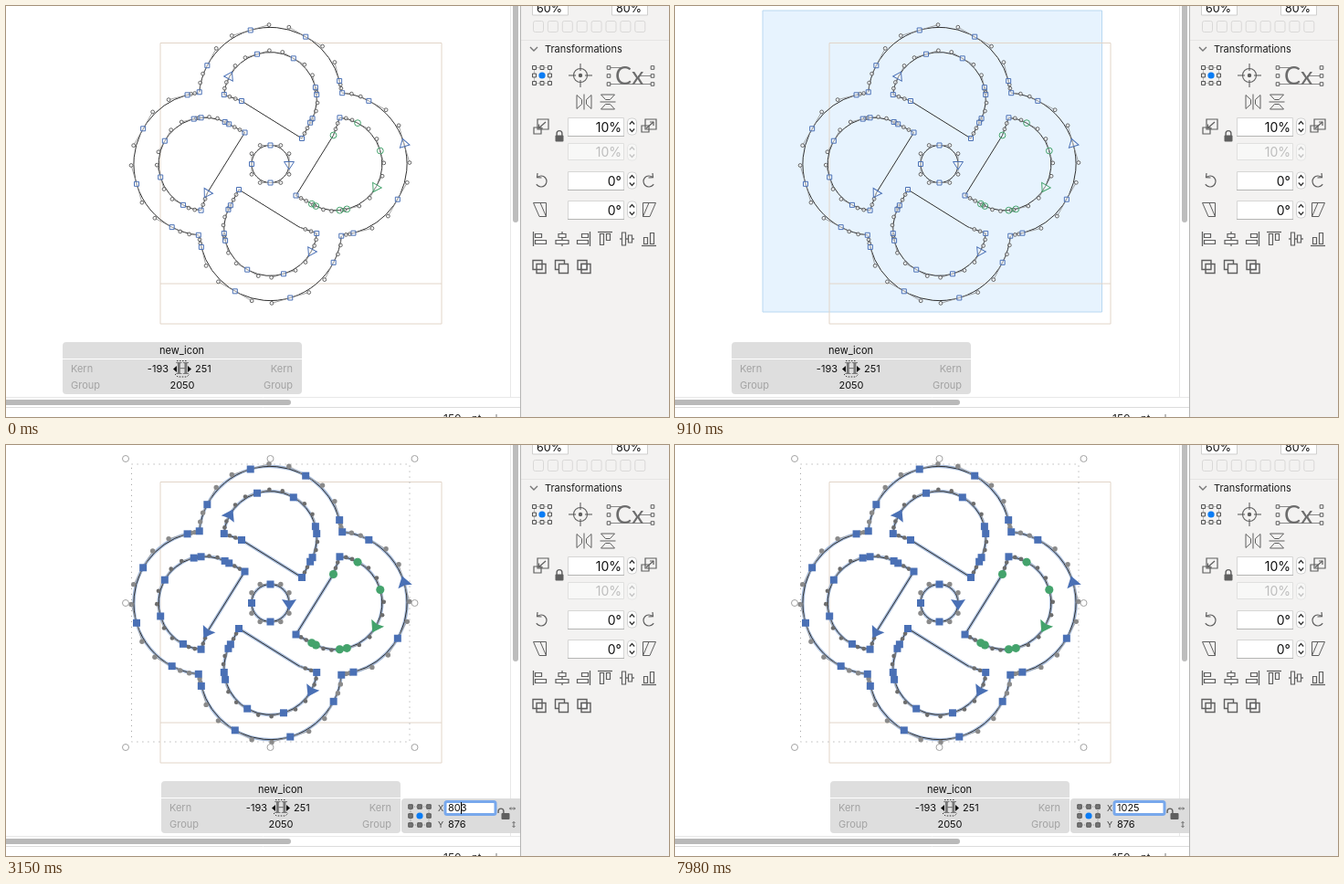
Animation, 726 px wide and 450 px high, one loop 8000 ms. Source, as an HTML page with a canvas:

```html
<!DOCTYPE html>
<html lang="en">
<head>
<meta charset="utf-8">
<title>Glyph editor</title>
<style>
html, body { margin: 0; width: 726px; height: 450px; overflow: hidden; background: #fff; }
canvas { display: block; width: 726px; height: 450px; }
</style>
</head>
<body>
<canvas id="stage"></canvas>
<script>
const W = 726, H = 450, LOOP = 8000;
const canvas = document.getElementById('stage');
const g = canvas.getContext('2d');
const dpr = window.devicePixelRatio || 1;
canvas.width = W * dpr;
canvas.height = H * dpr;

const BLUE = '#4a70b5', GREEN = '#44a36c', ACCENT = '#0a7cf5', INK = '#5f5f5f', PANEL = '#f3f2f1';
const CX = 289.5, CY = 173, LOBE = -71.5, R_OUT = 78.1, R_IN = 50.9;
const OUTER = [185.3, 207.7, 253.8, 299.7, 345.6, 354.7];
const INNER = [185, 208.2, 253.5, 299.8, 346, 355, 385.2, 391];
const TIP = [34.5, -28], HIP = [-31.5, -69];
const rad = d => d * Math.PI / 180;

// ---------- drawing helpers ----------
function line(color, width, ...pts) {
  g.beginPath();
  for (let i = 0; i < pts.length; i += 2) g.lineTo(pts[i], pts[i + 1]);
  g.strokeStyle = color;
  g.lineWidth = width;
  g.stroke();
}
function box(x, y, w, h, fill, stroke, r = 0, lw = 1) {
  g.beginPath();
  g.roundRect(x, y, w, h, r);
  if (fill) { g.fillStyle = fill; g.fill(); }
  if (stroke) { g.strokeStyle = stroke; g.lineWidth = lw; g.stroke(); }
}
function disc(x, y, r, fill, stroke, lw = 1) {
  g.beginPath();
  g.arc(x, y, r, 0, 7);
  if (fill) { g.fillStyle = fill; g.fill(); }
  if (stroke) { g.strokeStyle = stroke; g.lineWidth = lw; g.stroke(); }
}
function poly(fill, stroke, ...pts) {
  g.beginPath();
  for (let i = 0; i < pts.length; i += 2) g.lineTo(pts[i], pts[i + 1]);
  g.closePath();
  if (fill) { g.fillStyle = fill; g.fill(); }
  if (stroke) { g.strokeStyle = stroke; g.lineWidth = 1; g.stroke(); }
}
function text(s, x, y, size = 11, color = '#111', align = 'left', family = 'Inter, sans-serif', weight = 400) {
  g.font = `${weight} ${size}px ${family}`;
  g.textAlign = align;
  g.fillStyle = color;
  g.fillText(s, x, y);
}
function at(x, y, draw, angle = 0, flip = 1) {
  g.save();
  g.translate(x, y);
  g.rotate(angle);
  g.scale(flip, 1);
  draw();
  g.restore();
}

// ---------- glyph ----------
const polar = (r, d, cy = LOBE) => [r * Math.cos(rad(d)), cy + r * Math.sin(rad(d))];
const turn = (k, draw) => at(CX, CY, draw, k * Math.PI / 2);

function tracePath() {
  g.beginPath();
  for (let k = 0; k < 4; k++) turn(k, () => {
    g.moveTo(...polar(R_OUT, OUTER[0]));
    g.arc(0, LOBE, R_OUT, rad(OUTER[0]), rad(OUTER[5]));
    g.moveTo(...polar(R_IN, INNER[0]));
    g.arc(0, LOBE, R_IN, rad(INNER[0]), rad(INNER[7]));
    g.lineTo(...TIP);
    g.lineTo(...HIP);
    g.closePath();
  });
  g.moveTo(CX + 20.5, CY);
  g.arc(CX, CY, 20.5, 0, 7);
}
function handle(p, q, sel, small) {
  line(sel ? '#999' : '#8d8d8d', 0.8, ...p, ...q);
  if (sel) disc(...q, small ? 2.3 : 2.7, small ? '#6d6d6d' : '#8a8a8a');
  else disc(...q, 1.9, 'rgba(255,255,255,.6)', '#555', 0.9);
}
function arcHandles(r, degs, sel, small, cy) {
  for (let i = 1; i < degs.length; i++) {
    const a = rad(degs[i - 1]), b = rad(degs[i]);
    const len = 4 / 3 * Math.tan((b - a) / 4) * r;
    const p = polar(r, degs[i - 1], cy), q = polar(r, degs[i], cy);
    handle(p, [p[0] - len * Math.sin(a), p[1] + len * Math.cos(a)], sel, small);
    handle(q, [q[0] + len * Math.sin(b), q[1] - len * Math.cos(b)], sel, small);
  }
}
function lineHandles(p, q, sel) {
  const mix = f => [p[0] + (q[0] - p[0]) * f, p[1] + (q[1] - p[1]) * f];
  handle(p, mix(0.35), sel, true);
  handle(q, mix(0.68), sel, true);
}
function node(p, sel, color = BLUE) {
  const [x, y] = p;
  if (color === GREEN) disc(x, y, sel ? 4.5 : 3.4, sel ? GREEN : null, GREEN, sel ? 0.1 : 1);
  else if (sel) box(x - 4, y - 4, 8, 8, BLUE);
  else box(x - 2.5, y - 2.5, 5, 5, 'rgba(255,255,255,.4)', BLUE);
}
// flat triangle pointing along the path
function arrow(p, angle, sel, color = BLUE) {
  at(...p, () => sel
    ? poly(color, null, 8, 0, -4, -8, -2.5, 0, -4, 8)
    : poly('rgba(255,255,255,.3)', color, 6, 0, -2.5, -5.5, -2.5, 5.5), angle);
}
function drawGlyph(sel) {
  tracePath();
  if (sel) { g.strokeStyle = '#a5bad9'; g.lineWidth = 3.4; g.stroke(); }
  g.strokeStyle = '#2f2f2f';
  g.lineWidth = 1;
  g.stroke();

  for (let k = 0; k < 4; k++) turn(k, () => {
    arcHandles(R_OUT, OUTER, sel);
    arcHandles(R_IN, INNER, sel, true);
    lineHandles(polar(R_IN, INNER[7]), TIP, sel);
    lineHandles(HIP, polar(R_IN, INNER[0]), sel);
  });
  at(CX, CY, () => arcHandles(20.5, [0, 90, 180, 270, 360], sel, false, 0));

  const start = [1, 3, 1, 8];
  const slope = Math.atan2(HIP[1] - TIP[1], HIP[0] - TIP[0]);
  for (let k = 0; k < 4; k++) turn(k, () => {
    OUTER.slice(0, 5).forEach((d, i) => {
      const p = polar(R_OUT, d);
      if (k === 1 && i === 2) arrow(p, rad(d - 90), sel);
      else node(p, sel);
    });
    const soft = k === 1 ? GREEN : BLUE;
    const pts = [...INNER.map(d => polar(R_IN, d)), HIP];
    pts.forEach((p, i) => {
      if (i === start[k]) arrow(p, i < 8 ? rad(INNER[i] + 90) : slope, sel, soft);
      else if (!(k === 2 && i === 8)) node(p, sel, i ? soft : BLUE);
    });
    node(TIP, sel);
  });
  for (const d of [90, 180, 270]) at(CX, CY, () => node(polar(20.5, d, 0), sel));
  arrow([CX + 20.5, CY], Math.PI / 2, sel);
}
function drawBounds() {
  g.setLineDash([1.2, 4.8]);
  box(137.5, 21, 304.5, 304, null, '#aaa');
  g.setLineDash([]);
  for (const x of [131, 289.5, 447.5])
    for (const y of [15, 173, 331])
      if (x !== 289.5 || y !== 173) disc(x, y, 3.5, '#fff', '#a3a3a3');
}

// ---------- marquee ----------
function marquee(t) {
  const s = Math.floor(t / 70) * 70;
  const keys = [[630, 277, 199], [910, 371.5, 330], [980, 377.5, 339], [1190, 385, 340.5]];
  if (s < 630) {
    const p = Math.pow((s - 140) / 490, 1.4);
    return [277 * p, 199 * p];
  }
  for (let i = 1; i < keys.length; i++) {
    const [a, aw, ah] = keys[i - 1], [b, bw, bh] = keys[i];
    if (s <= b) {
      const f = (s - a) / (b - a);
      return [aw + (bw - aw) * f, ah + (bh - ah) * f];
    }
  }
  return [385, 340.5];
}

// ---------- info strip ----------
function padlock(x, y, open) {
  box(x - 4.5, y - 1, 9, 7, INK, null, 1);
  g.beginPath();
  g.arc(x - (open ? 5 : 0), y - 3, 2.9, Math.PI, 0);
  g.lineTo(x + (open ? -2.1 : 2.9), y);
  g.moveTo(x - (open ? 7.9 : 2.9), y - 3);
  g.lineTo(x - (open ? 7.9 : 2.9), y - (open ? 1 : 0));
  g.strokeStyle = INK;
  g.lineWidth = 1.4;
  g.stroke();
}
function refGrid(x, y, step, size, fill) {
  g.setLineDash([1, 1]);
  box(x - step, y - step, step * 2, step * 2, null, '#888');
  g.setLineDash([]);
  for (const i of [-1, 0, 1]) for (const j of [-1, 0, 1])
    if (i || j) box(x + i * step - size / 2, y + j * step - size / 2, size, size, fill, '#555');
  disc(x, y, 3.6, ACCENT);
}
function drawInfo(x) {
  const GREY = '#a3a3a3';
  box(x, 368, 262, 18, '#dedede', null, [4, 4, 0, 0]);
  box(x, 387, 262, 38, '#dedede', null, [0, 0, 4, 4]);
  text('new_icon', x + 130.5, 381, 11, '#111', 'center');
  for (const [s, y] of [['Kern', 401], ['Group', 419]]) {
    text(s, x + 9, y, 11, GREY);
    text(s, x + 252, y, 11, GREY, 'right');
  }
  text('-193', x + 116, 401, 11, '#111', 'right');
  text('251', x + 145, 401);
  text('2050', x + 131, 419, 11, '#111', 'center');
  at(x + 131, 397, () => {
    text('H', 0, 6, 18, '#777', 'center', '"Noto Serif", serif', 700);
    g.setLineDash([1.5, 1.5]);
    line('#444', 1, -6, -8.5, 6, -8.5);
    line('#333', 1, -8, 6, -5, 9, 5, 9, 8, 6);
    g.setLineDash([]);
    poly('#111', null, -10, 0.5, -6, -3, -6, 4);
    poly('#111', null, 10, 0.5, 6, -3, 6, 4);
  });
}

// [time, value, caret index, all selected]
const TYPING = [
  [3150, '803', 2], [3850, '803', 3], [3990, '803', -1, true],
  [5950, '1', 1], [6370, '10', 2], [6930, '10', -1], [7000, '102', 3],
  [7350, '1025', 4], [7980, '1025', -1]
];
function drawCoords(t) {
  box(433, 387, 130, 38, '#dcdcdc', null, [4, 0, 0, 4]);
  refGrid(453, 406, 10, 4.5, '#777');
  text('X', 473, 401, 9, '#444');
  text('Y', 473, 419, 9, '#444');
  text('876', 484, 419);
  const state = TYPING.filter(k => k[0] <= t).pop();
  if (state) {
    const [, value, caret, all] = state;
    box(481, 390.5, 55, 14, '#fff', '#78a8ec', 2, 3);
    g.font = '11px Inter, sans-serif';
    if (all) box(483.5, 391, g.measureText(value).width + 1.5, 13, '#b3d7ff');
    text(value, 484, 401);
    if (caret >= 0) {
      const cx = Math.round(484 + g.measureText(value.slice(0, caret)).width) + 0.5;
      line('#000', 1, cx, 391, cx, 404);
    }
  } else text('803', 484, 401);
  padlock(547, 404, true);
  const double = () => {
    line(INK, 0.9, -3, 0, 3, 0);
    line(INK, 0.9, -1.5, -1.5, -3, 0, -1.5, 1.5);
    line(INK, 0.9, 1.5, -1.5, 3, 0, 1.5, 1.5);
  };
  at(554.5, 398, double);
  at(556, 415.5, double, Math.PI / 2);
}

function drawPointer(t) {
  if (t >= 4130 && t < 4480) {
    line('#222', 1, 502.5, 388, 502.5, 404);
    line('#222', 1, 499, 387, 502.5, 388.5, 506, 387);
    line('#222', 1, 499, 404.5, 502.5, 403, 506, 404.5);
  }
  if (t >= 5390 && t < 5950)
    poly('#000', '#fff', 579, 369, 579, 382.5, 582.2, 379.6, 584.5, 385, 586.8, 384, 584.5, 378.8, 589, 378.6);
}

// ---------- sidebar ----------
function field(y, s, off) {
  box(615.5, y + 0.5, 61, off ? 18 : 20, off ? '#f8f8f7' : '#fff', off ? '#e0e0df' : '#d6d6d5');
  if (!off) line('#b5b5b4', 1, 615, y + 20.5, 677, y + 20.5);
  text(s, 674, y + (off ? 14.5 : 15.5), 14, off ? '#bdbdbd' : '#111', 'right');
  const m = y + 10, c = off ? '#c4c4c4' : '#333';
  box(680.5, m - 9, 10, 18, off ? '#f7f7f6' : '#fff', off ? '#e6e6e5' : '#d0d0d0', 4);
  line(c, 1.3, 682.8, m - 2.5, 685.5, m - 5.5, 688.2, m - 2.5);
  line(c, 1.3, 682.8, m + 2.5, 685.5, m + 5.5, 688.2, m + 2.5);
}
function scaleIcon(grow) {
  box(-8, grow ? -1 : 1, 8, 7, null, INK, 0, 1.2);
  box(-4, -8, 12, 11, null, INK, 0, 1.2);
  line(INK, 1.2, -3, 2, 5, -5);
  if (grow) line(INK, 1.2, 1, -5, 5, -5, 5, -1);
  else line(INK, 1.2, -2.5, -2.5, -2.5, 2, 2, 2);
}
function rotateIcon() {
  g.beginPath();
  g.arc(0, 1, 6, -2.3, 2.6);
  g.strokeStyle = INK;
  g.lineWidth = 1.2;
  g.stroke();
  line(INK, 1.2, -4, -8, -4.5, -3.3, 0.5, -3);
}
function skewIcon() {
  poly(null, INK, -7.5, -7.5, 6.5, -7.5, 6.5, 7.5, -1, 7.5);
  line(INK, 1, 0, -7.5, 6.5, 7.5);
}
function alignIcon(center) {
  line(INK, 1.3, center ? 0 : -7.5, -8, center ? 0 : -7.5, 8);
  box(center ? -4 : -5.5, -5.5, center ? 8 : 7, 4, PANEL, INK, 0, 1.2);
  box(center ? -7 : -5.5, 1.5, center ? 14 : 12, 4, PANEL, INK, 0, 1.2);
}
function flipIcon() {
  line(INK, 1, 0, -8.5, 0, 8.5);
  for (const s of [-1, 1]) poly(null, INK, 8 * s, -7.5, 2.5 * s, -2.5, 2.5 * s, 2.5, 8 * s, 7.5);
}
function metricsIcon() {
  line('#888', 1, 660, 67.5, 674, 67.5);
  line('#888', 1, 692, 76.5, 708, 76.5);
  line('#888', 1, 660, 85.5, 708, 85.5);
  text('Cx', 667, 86, 27, '#6c6c6c', 'left', 'Lato, sans-serif');
  for (const [x, y] of [[660, 67.5], [660, 76.5], [660, 85.5], [708, 67.5], [708, 76.5], [708, 85.5]])
    box(x - 1.8, y - 1.8, 3.6, 3.6, '#eee', INK);
}
function drawSidebar() {
  box(563, 0, 163, H, PANEL);
  line('#b4b4b3', 1, 563.5, 0, 563.5, H);
  for (const [x, s] of [[576, '60%'], [663, '80%']]) {
    box(x + 0.5, -10, 39, 20, '#fff', '#cfcfce');
    text(s, x + 33, 7, 12.5, '#111', 'right');
  }
  for (let i = 0; i < 8; i++) box(577.5 + i * 15.9, 16.5, 11, 12, null, '#d9d8d7', 2);
  line('#e6e5e4', 1, 564, 37.5, W, 37.5);
  line('#777', 1.4, 574, 45, 578, 49, 582, 45);
  text('Transformations', 590, 51, 11, '#1c1c1c');

  refGrid(587, 76, 8.5, 4, '#e4e4e3');
  disc(629, 76, 7.5, null, INK, 1.1);
  disc(629, 76, 2.2, INK);
  for (let i = 0; i < 4; i++) at(629, 76, () => line(INK, 1.1, 5, 0, 13, 0), i * Math.PI / 2);
  metricsIcon();

  at(633, 105, flipIcon);
  at(659, 105, flipIcon, Math.PI / 2);
  at(586, 132, () => scaleIcon(false));
  at(704, 132, () => scaleIcon(true));
  padlock(606, 142.5, false);
  field(122, '10%');
  field(150, '10%', true);
  field(181, '0°');
  field(213, '0°');
  at(586, 191, rotateIcon);
  at(704, 191, rotateIcon, 0, -1);
  at(585, 223, skewIcon);
  at(704, 223, skewIcon, 0, -1);

  at(585, 255, () => alignIcon());
  at(609, 255, () => alignIcon(true));
  at(632, 255, () => alignIcon(), 0, -1);
  at(656, 255, () => alignIcon(), Math.PI / 2);
  at(680, 255, () => alignIcon(true), Math.PI / 2);
  at(704, 255, () => alignIcon(), -Math.PI / 2);

  [584, 608.5, 633].forEach((x, i) => {
    box(x - 7, 278.5, 10, 10, null, INK, 0, 1.4);
    box(x - 3, 282.5, 10, 10, i === 1 ? PANEL : null, INK, 0, 1.4);
    if (i === 2) box(x - 3, 282.5, 6, 6, '#fff', INK, 0, 1.4);
  });
}

// ---------- editor frame ----------
function drawChrome() {
  line('#e8e8e8', 1, 552.5, 0, 552.5, 428);
  line('#e8e8e8', 1, 0, 428.5, 563, 428.5);
  line('#dcdcdc', 1, 0, 439.5, 563, 439.5);
  box(555, -10, 6, 247, '#bdbdbd', null, 3);
  box(-10, 431, 322, 6, '#b9b9b9', null, 3);
  text('150', 479, 456, 12, '#222');
  text('pt', 510, 456, 11, '#222');
  line('#777', 1, 537, 447, 537, 450);
}

function draw(t) {
  g.setTransform(dpr, 0, 0, dpr, 0, 0);
  g.fillStyle = '#fff';
  g.fillRect(0, 0, W, H);
  const selected = t >= 1470;
  if (t >= 210 && !selected) {
    const [w, h] = marquee(t);
    box(96, 5, w, h, '#e7f3fe', '#b9d8f1');
  }
  box(169, 40.5, 308, 307.5, null, '#e2d5c8');
  line('#e2d5c8', 1, 169, 304, 477, 304);
  drawGlyph(selected);
  if (selected) drawBounds();
  drawChrome();
  drawInfo(t < 1540 ? 62 : 170);
  if (t >= 1540) drawCoords(t);
  drawSidebar();
  drawPointer(t);
}

const begin = performance.now();
function tick() {
  draw((performance.now() - begin) % LOOP);
  requestAnimationFrame(tick);
}
tick();
</script>
</body>
</html>
```
